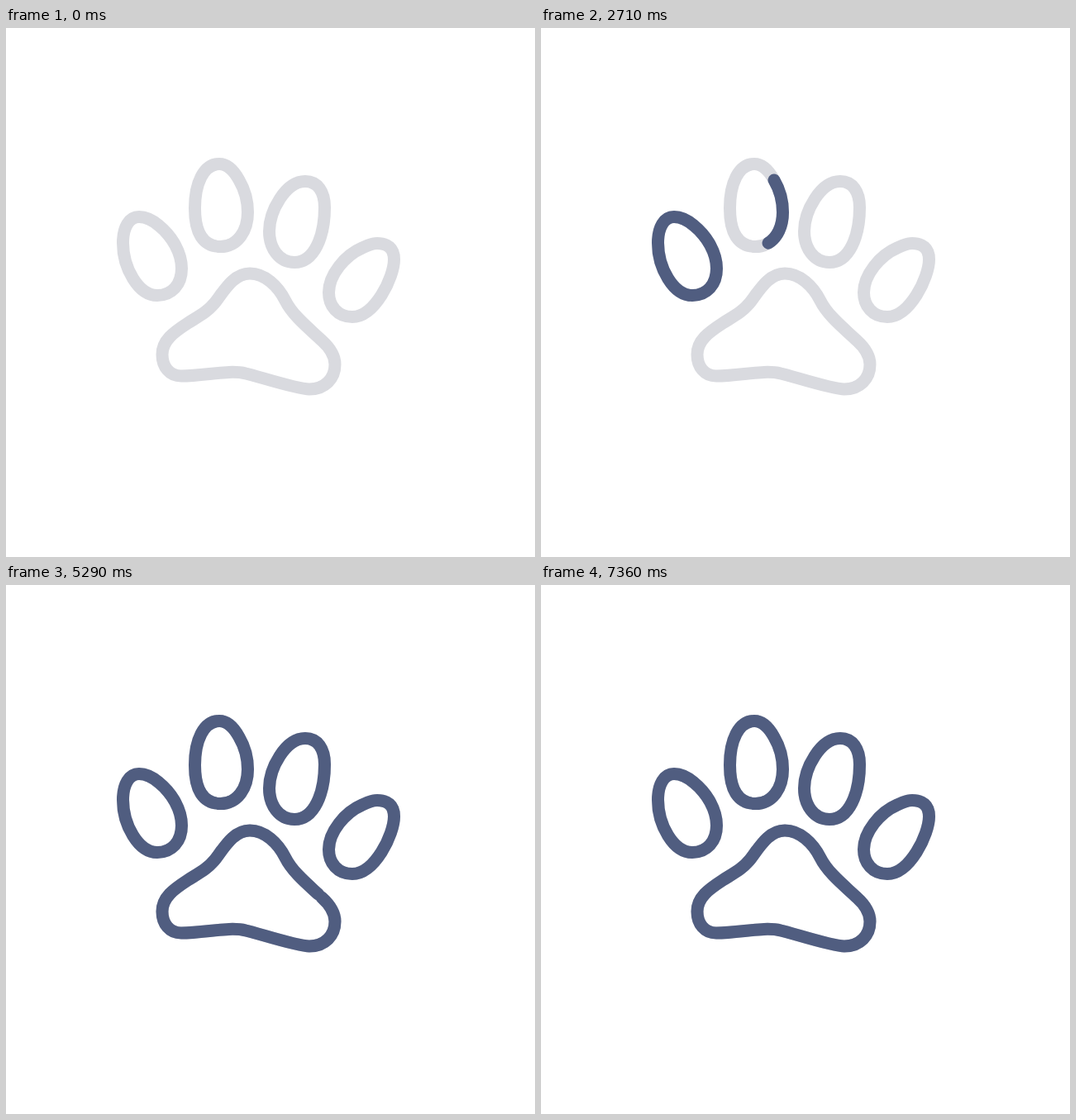
Write an HTML page that moves like this. It is 640x640 px and loops after 8 s.

```html
<!DOCTYPE html>
<html lang="en">
<head>
<meta charset="utf-8">
<title>Paw loader</title>
<style>
  html, body { margin: 0; width: 100%; height: 100%; overflow: hidden; background: #fff; }
  svg { display: block; width: 100%; height: 100%; }
  path { fill: none; stroke-width: 15; stroke-linecap: round; stroke-linejoin: round; }
  .track path { stroke: #d9dadf; }
  .ink path { stroke: #505d80; }
</style>
</head>
<body>
<svg viewBox="0 0 640 640">
  <g class="track"></g>
  <g class="ink"></g>
</svg>
<script>
const SHAPES = [
  'M185 239C201 252 212.5 272 212.5 291C212.5 310 201 323.5 183 323.5C160 323.5 141.5 290 141.5 260C141.5 241 149 228.5 161 228.5C170 228.5 178 233 185 239Z',
  'M282 184C288.5 195 292.5 209 292.5 223C292.5 247 279 264.5 259.5 264.5C239 264.5 228.5 249 228.5 218C228.5 188 239 164.5 258 164.5C268 164.5 276 173 282 184Z',
  'M362 185.5C377 185.5 385.5 198 385.5 217C385.5 252 373 283.5 349 283.5C330 283.5 318.5 266 318.5 246C318.5 222 338 185.5 362 185.5Z',
  'M449 260.5C461 260.5 469.5 266 469.5 280C469.5 302 446 349.5 419 349.5C401 349.5 390.5 336 390.5 320C390.5 299 410 275 431 266C437 263 443 260.5 449 260.5Z',
  'M382 378C392 387 398 396 398 407C398 424 386 437 367 437C352 437 304 421 290 418C270 413 241 421 212 421C198 421 189 410 189 395C189 378 203 368 220 357C236 347 244 343 253 332C265 316 276 297 295 297C313 297 329 312 338 330C347 348 366 363 382 378Z'
];
const LOOP = 8000, FPS = 14;
const CYCLE = 3157, DRAW = 1036, ERASE_AT = 2087;

function addPath(group, d) {
  const path = document.createElementNS('http://www.w3.org/2000/svg', 'path');
  path.setAttribute('d', d);
  document.querySelector(group).appendChild(path);
  return path;
}

const strokes = SHAPES.map(d => {
  addPath('.track', d);
  const path = addPath('.ink', d);
  return { path, length: path.getTotalLength() };
});
const total = strokes.reduce((sum, s) => sum + s.length, 0);

const bezier = (a, b, s) => 3 * a * s * (1 - s) ** 2 + 3 * b * s * s * (1 - s) + s ** 3;

function ease(x) {
  if (x <= 0) return 0;
  if (x >= 1) return 1;
  let lo = 0, hi = 1;
  for (let i = 0; i < 30; i++) {
    const mid = (lo + hi) / 2;
    if (bezier(0.656, 0.325, mid) < x) lo = mid; else hi = mid;
  }
  return bezier(0.045, 1, lo);
}

// One pen runs through all shapes in turn, then back again.
function progress(t) {
  const u = t % CYCLE;
  return u < ERASE_AT ? ease(u / DRAW) : 1 - ease((u - ERASE_AT) / DRAW);
}

function render(ms) {
  const step = Math.floor((ms % LOOP + 5) * FPS / 1000);
  let left = progress(step * 1000 / FPS) * total;
  for (const { path, length } of strokes) {
    const shown = Math.min(left, length);
    path.style.display = shown > 0 ? '' : 'none';
    path.style.strokeDasharray = shown >= length - 0.01 ? 'none' : `${shown} ${length * 2}`;
    left -= length;
  }
}

const start = performance.now();
function tick() {
  render(performance.now() - start);
  requestAnimationFrame(tick);
}
tick();
</script>
</body>
</html>
```
